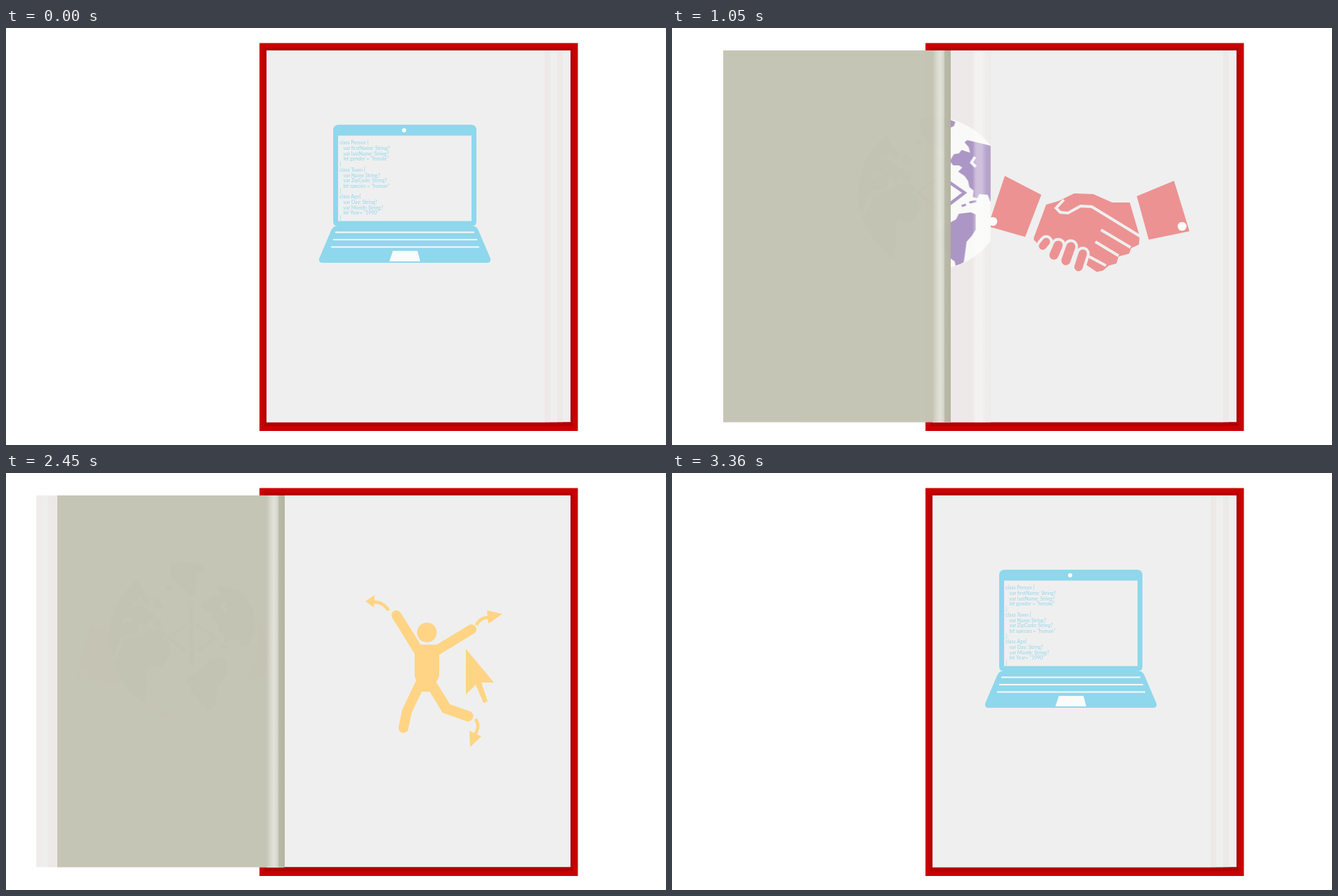
An HTML page with a canvas that plays this animation: 940x595 px, repeating every 3.43 s.

```html
<!DOCTYPE html>
<html lang="en">
<head>
<meta charset="utf-8">
<title>Flip book</title>
<style>
html, body { margin: 0; width: 100%; height: 100%; overflow: hidden; background: #fff; }
canvas { display: block; }
</style>
</head>
<body>
<canvas id="stage" width="940" height="595"></canvas>
<script>
const W = 940, H = 595, LOOP = 3430, TICK = 70;
const LEFT = 371, TOP = 32, HEIGHT = 530.5;
const ctx = document.getElementById('stage').getContext('2d');
const GREY = '#efefef', PINK = '#ede9e8', COVER_BACK = '#c4c4b4';

function poly(c, color, ...p) {
  c.fillStyle = color;
  c.beginPath();
  for (let i = 0; i < p.length; i += 2) c.lineTo(p[i], p[i + 1]);
  c.closePath();
  c.fill();
}

function line(c, color, width, ...p) {
  c.strokeStyle = color;
  c.lineWidth = width;
  c.beginPath();
  for (let i = 0; i < p.length; i += 2) c.lineTo(p[i], p[i + 1]);
  c.stroke();
}

function oval(c, color, x, y, rx, ry = rx, turn = 0) {
  c.fillStyle = color;
  c.beginPath();
  c.ellipse(x, y, rx, ry, turn, 0, Math.PI * 2);
  c.fill();
}

function path(c, color, d, width) {
  c.fillStyle = c.strokeStyle = color;
  c.lineWidth = width;
  const shape = new Path2D(d);
  if (width) c.stroke(shape); else c.fill(shape);
}

const CODE = `class Person {
  var firstName: String?
  var lastName: String?
  let gender = "female"
}
class Town {
  var Name String?
  var ZipCode: String?
  let species = "human"
}
class Age{
  var Day: String?
  var Month: String?
  let Year= "1990"
}`;

function laptop(c) {
  const blue = '#8fd7ec';
  path(c, blue, 'M474 138H662Q670 138 670 146V276Q670 283 663 283H473Q466 283 466 276V146Q466 138 474 138Z');
  path(c, blue, 'M468 283H668Q671 285 673 289L690 329Q691 335 685 335H451Q445 335 446 329L463 289Q465 285 468 283Z');
  c.fillStyle = GREY;
  c.fillRect(473, 153.5, 190, 122);
  oval(c, '#fcfcfc', 567, 146, 3);
  [[469, 667, 291.5], [466, 671, 302], [463, 674, 312.5]].forEach(([a, b, y]) => line(c, '#f5fafb', 2, a, y, b, y));
  poly(c, '#fafbfb', 551, 318, 586, 318, 590, 333, 546, 333);
  c.fillStyle = blue;
  c.font = '7px Lato, sans-serif';
  c.textBaseline = 'alphabetic';
  CODE.split('\n').forEach((text, i) =>
    c.fillText(text.trim(), text[0] === ' ' ? 480.5 : 475, 166.3 + i * 7.7));
}

function globe(c) {
  const violet = '#9f85bf', white = '#fcfcfc';
  oval(c, white, 582.5, 236, 106.5, 109);
  c.save();
  c.beginPath();
  c.ellipse(582.5, 236, 106, 108.5, 0, 0, Math.PI * 2);
  c.clip();
  // Greenland, Iceland, Britain
  path(c, violet, 'M550 134L565 128L585 125L602 130L599 152L588 160L578 168L574 177L566 174L564 160L564 145L552 140Z');
  oval(c, violet, 602, 164, 5.5, 3.7);
  oval(c, violet, 621, 186, 4, 8, -0.3);
  oval(c, violet, 615, 190, 2.5, 4);
  // Americas
  path(c, violet, 'M485 185L500 168L520 163L533 160L537 163L531 170L529 178L541 174L545 179L552 180L558 190L553 196L545 196L540 199L546 205L537 211L532 218L530 227L524 232L525 241L519 243L516 237L504 238L500 248L490 246L480 225Z');
  line(c, white, 4, 522, 184, 527, 192, 521, 198);
  path(c, violet, 'M521 266L528 263L545 265L549 273L560 279L565 286L578 290L579 296L573 303L571 314L562 319L558 328L551 333L549 342L538 334L536 320L534 305L527 297L521 288Z');
  line(c, violet, 3, 520, 247, 530, 249);
  line(c, violet, 3, 535, 252, 541, 254);
  // Africa and Eurasia
  path(c, violet, 'M607 228L613 223L635 221L637 228L648 231L653 236L666 235L671 250L679 266L685 265L684 271L678 283L668 298L657 318L637 332L636 318L634 300L636 290L633 277L629 274L615 278L607 270L600 258L602 245Z');
  path(c, violet, 'M614 220L614 208L622 207L624 200L634 196L640 190L638 186L631 188L629 180L640 168L648 151L657 160L670 174L682 195L690 220V262L680 263L676 248L668 240L668 233L650 230L646 226L648 218L640 213L636 216L640 219L637 222L633 215L627 210L625 218L618 222Z');
  line(c, white, 3, 638, 190, 642, 182, 646, 176);
  line(c, white, 3.5, 641, 187, 656, 185);
  line(c, white, 4, 655, 210, 662, 208, 669, 213);
  line(c, white, 2, 669, 237, 676, 250, 679, 263);
  oval(c, white, 678, 290, 4, 10, 0.4);
  c.restore();
  for (const [color, width] of [[white, 10], [violet, 4.5]]) {
    line(c, color, width, 563, 217, 537, 235, 563, 255);
    line(c, color, width, 578, 217, 604, 235, 578, 255);
  }
  poly(c, violet, 569, 184, 575, 183, 573, 275, 567, 277);
}

function handshake(c) {
  const rose = '#ec9292';
  poly(c, rose, 474, 211, 526, 238, 503, 298, 450, 283);
  oval(c, '#fcfcfc', 457, 276, 6.3);
  poly(c, rose, 662, 240, 715, 218, 737, 290, 679, 302);
  oval(c, '#fcfcfc', 726.5, 283, 6.3);
  path(c, rose, 'M533 252L550 247L573 236L600 237L627 249L652 249L666 297L665 309L654 314L651 322L636 326L633 336L622 339L614 346L605 348L590 338L590 322L515 303Z');
  poly(c, rose, 533, 252, 515, 300, 520, 308, 540, 308, 580, 322, 598, 318);
  c.lineJoin = 'miter';
  line(c, GREY, 4, 558, 245, 547, 257, 553, 263, 564, 264, 582, 254, 598, 255, 668, 298);
  line(c, GREY, 4, 611, 288, 653, 313);
  line(c, GREY, 4, 603, 305, 636, 325);
  line(c, GREY, 4, 590, 324, 618, 339);
  const fingers = [[533, 305, 528, 311, 11], [550, 310, 544, 324, 13], [568, 312, 561, 332, 13], [585, 322, 579, 341, 12]];
  c.lineCap = 'round';
  for (const [x, y, ex, ey, w] of fingers) line(c, GREY, w + 8, x, y, ex, ey);
  for (const [x, y, ex, ey, w] of fingers) line(c, rose, w, x, y, ex, ey);
  c.lineCap = 'butt';
}

function pen(c) {
  const green = '#c0d976';
  path(c, green, 'M465 187C495 183 515 192 533 213L528 222C510 225 496 222 488 210C480 199 475 195 465 187Z');
  path(c, green, 'M538 214L582 224L586 220L635 239L633 250L730 301L727 309L630 273L626 301L562 357L555 355L548 268L566 246L533 224Z');
  poly(c, green, 591, 197, 646, 220, 638, 235, 588, 215);
  oval(c, PINK, 587, 286, 13);
  line(c, PINK, 4, 557, 360, 585, 295);
}

function dancer(c) {
  const sand = '#ffd484';
  oval(c, sand, 599.5, 227.5, 14);
  poly(c, sand, 582, 245, 617, 245, 617, 290, 605, 312, 590, 312, 582, 290);
  c.lineCap = 'round';
  line(c, sand, 14, 609, 256, 663, 223);
  line(c, sand, 14, 589, 256, 568, 222, 556, 203);
  c.lineJoin = 'miter';
  line(c, sand, 15, 605, 300, 627, 336, 658, 347);
  line(c, sand, 14, 590, 300, 571, 340, 566, 364);
  c.lineCap = 'butt';
  path(c, sand, 'M670 217Q675 206 688 206', 4.5);
  poly(c, sand, 685, 196, 707, 201, 687, 215);
  path(c, sand, 'M669 351Q676 363 667 374', 4.5);
  poly(c, sand, 660, 368, 677, 376, 661, 391);
  path(c, sand, 'M545 196Q537 184 524 184', 4.5);
  poly(c, sand, 525, 174, 512, 183, 524, 192);
  poly(c, sand, 655, 251, 695, 299, 677, 299, 686, 326, 680, 328, 669, 302, 655, 316);
}

// start, steps and pace of each turn, and when the page snaps back
const pages = [
  { right: 767, color: GREY, art: laptop, end: 420, start: 210, steps: 7, pace: .1015, back: 3360 },
  { right: 775, color: PINK, art: globe, end: 417.5, start: 840, steps: 6, pace: .1335, back: 3220 },
  { right: 785, color: GREY, art: handshake, end: 418, start: 1400, steps: 7, pace: .133, back: 3080 },
  { right: 793, color: PINK, art: pen, end: 418, start: 2030, steps: 7, pace: .128, back: 2940 },
  { right: 804, color: GREY, art: dancer, end: 418, start: 2590, peek: [.35, .671, .38], back: 2800 }
];

for (const page of pages) {
  page.image = document.createElement('canvas');
  page.image.width = W;
  page.image.height = H;
  const c = page.image.getContext('2d');
  c.fillStyle = page.color;
  c.fillRect(LEFT, TOP, page.right - LEFT, HEIGHT);
  page.art(c);
}

function turned(page, t) {
  if (t < page.start || t >= page.back) return 0;
  const step = Math.floor((t - page.start) / TICK);
  if (page.peek) return page.peek[Math.min(step, 2)];
  const left = Math.max(0, page.steps - 1 - step);
  return .5 - .5 * Math.cos(Math.PI * (1 - left * page.pace));
}

function pose(page, t) {
  const s = turned(page, t);
  const axis = page.right + (page.end - page.right) * s;
  return { s, axis, fold: axis - 23 * Math.min(1, s * 10) };
}

function shadeFold(fold, x, isCover) {
  const g = ctx.createLinearGradient(fold - 26, 0, fold, 0);
  const stops = isCover
    ? [[0, '255,255,255,0'], [.2, '255,255,255,.28'], [.4, '255,255,255,.5'], [.62, '255,255,255,.28'], [.72, '80,80,50,.1'], [1, '80,80,50,.14']]
    : [[0, '255,255,255,0'], [.2, '255,255,255,.4'], [.5, '255,255,255,.42'], [.75, '255,255,255,.15'], [1, '255,255,255,.1']];
  for (const [at, rgba] of stops) g.addColorStop(at, `rgba(${rgba})`);
  ctx.fillStyle = g;
  const from = Math.max(x, fold - 26);
  ctx.fillRect(from, TOP, fold - from, HEIGHT);
}

function drawSheet(page, { s, axis, fold }) {
  const isCover = page === pages[0];
  const x = 2 * axis - page.right, width = fold - x;
  if (s === 0 || width <= 0) return;
  ctx.save();
  ctx.globalAlpha = isCover && s > .85 ? .83 + (s - .85) : .83;
  if (isCover) {
    ctx.fillStyle = COVER_BACK;
    ctx.fillRect(x, TOP, width, HEIGHT);
  } else {
    ctx.beginPath();
    ctx.rect(x, TOP, width, HEIGHT);
    ctx.clip();
    ctx.translate(2 * axis, 0);
    ctx.scale(-1, 1);
    ctx.drawImage(page.image, 0, 0);
  }
  ctx.restore();
  shadeFold(fold, x, isCover);
}

function draw(t) {
  ctx.fillStyle = '#fff';
  ctx.fillRect(0, 0, W, H);
  ctx.fillStyle = '#c90003';
  ctx.fillRect(361, 21.5, 453.5, 553.5);
  ctx.fillStyle = '#b00000';
  ctx.fillRect(368, 28.5, 439, 539.5);

  const poses = pages.map(page => pose(page, t));
  for (let i = pages.length - 1; i >= 0; i--) {
    ctx.save();
    ctx.beginPath();
    ctx.rect(LEFT, TOP, poses[i].fold - LEFT, HEIGHT);
    ctx.clip();
    ctx.drawImage(pages[i].image, 0, 0);
    ctx.restore();
  }
  for (let i = pages.length - 1; i >= 0; i--) drawSheet(pages[i], poses[i]);
}

function tick() {
  draw(performance.now() % LOOP);
  requestAnimationFrame(tick);
}
tick();
</script>
</body>
</html>
```
